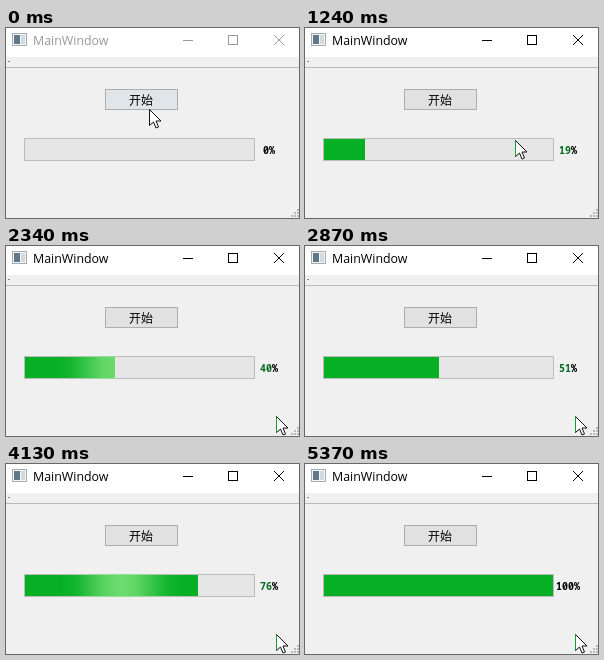
Write an HTML page with a canvas that moves like this. It is 293 px wide and 190 px high and loops after 5.45 s.

```html
<!DOCTYPE html>
<html lang="zh">
<head>
<meta charset="utf-8">
<title>MainWindow</title>
<style>
html, body { margin: 0; width: 100%; height: 100%; overflow: hidden; background: #f0f0f0; }
canvas { display: block; width: 293px; height: 190px; }
</style>
</head>
<body>
<canvas id="stage" width="293" height="190"></canvas>
<script>
const ctx = document.getElementById('stage').getContext('2d');
const LOOP = 5450;
const FIRST_TICK = 69;
const TICK = 77.8;
const PRESS = FIRST_TICK + TICK;
const RELEASE = PRESS + TICK;
const PROGRESS_START = 247;
const MS_PER_PERCENT = 50.85;
const BAR = { x: 18, y: 110, w: 231, h: 23 };
const GLOW = { width: 120, period: 1770, lead: 55, msPerPixel: 4 };

const POINTER_PATH = [
  { t: 300, x: 143, y: 81 },
  { t: 1236, x: 210, y: 112 },
  { t: 2014, x: 269, y: 162 },
  { t: 2090, x: 270, y: 170 }
];

const clamp = (v, low, high) => Math.max(low, Math.min(high, v));
const lerp = (a, b, k) => a + (b - a) * k;

// The screen refreshes at a fixed rate after a short first pause.
function lastTick(t) {
  return t < FIRST_TICK ? 0 : FIRST_TICK + Math.floor((t - FIRST_TICK) / TICK) * TICK;
}

function percentAt(t) {
  return clamp(Math.floor((t - PROGRESS_START) / MS_PER_PERCENT), 0, 100);
}

function pointerAt(t) {
  const i = POINTER_PATH.findIndex(point => point.t > t);
  if (i === 0) return POINTER_PATH[0];
  if (i < 0) return POINTER_PATH[POINTER_PATH.length - 1];
  const a = POINTER_PATH[i - 1], b = POINTER_PATH[i];
  const k = (t - a.t) / (b.t - a.t);
  return { x: Math.round(lerp(a.x, b.x, k)), y: Math.round(lerp(a.y, b.y, k)) };
}

function rect(color, x, y, w, h) {
  ctx.fillStyle = color;
  ctx.fillRect(x, y, w, h);
}

function panel(fill, border, x, y, w, h) {
  rect(border, x, y, w, h);
  rect(fill, x + 1, y + 1, w - 2, h - 2);
}

function text(value, font, color, x, y, align = 'left') {
  ctx.font = font;
  ctx.fillStyle = color;
  ctx.textAlign = align;
  ctx.fillText(value, x, y);
}

function clipped(x, y, w, h, paint) {
  ctx.save();
  ctx.beginPath();
  ctx.rect(x, y, w, h);
  ctx.clip();
  paint();
  ctx.restore();
}

function drawWindow() {
  rect('#f0f0f0', 0, 0, 293, 190);
  rect('#b9b9b9', 0, 39, 293, 1);
  rect('#8a8a8a', 2, 33, 2, 1);
  for (let row = 0; row < 3; row++) {
    for (let col = 2 - row; col < 3; col++) {
      rect('#b8b8b8', 285 + col * 3, 181 + row * 3, 2, 2);
    }
  }
}

function drawTitleBar(active) {
  const ink = active ? '#000' : '#999';
  rect('#fff', 0, 0, 293, 29);

  panel('#f4f5f6', '#a5adb3', 6, 5, 15, 13);
  rect('#60788a', 8, 7, 6, 9);
  rect('#d3dade', 15, 7, 4, 9);

  text('MainWindow', '500 12.4px "Open Sans", "Noto Sans", sans-serif', ink, 27, 17);

  rect(ink, 177, 12, 10, 1);
  ctx.strokeStyle = ink;
  ctx.lineWidth = 1;
  ctx.strokeRect(222.5, 7.5, 9, 9);
  ctx.beginPath();
  ctx.moveTo(268, 7);
  ctx.lineTo(278, 17);
  ctx.moveTo(278, 7);
  ctx.lineTo(268, 17);
  ctx.stroke();
}

function drawButton(t) {
  const pressed = t >= PRESS && t < RELEASE;
  panel('#e1e1e1', pressed ? '#005499' : '#adadad', 99, 61, 73, 21);
  ctx.globalAlpha = clamp(1 - (t - 380) / 300, 0, 1);
  rect(pressed ? '#cce4f7' : '#dfe5e9', 100, 62, 71, 19);
  ctx.globalAlpha = 1;
  text('开始', '500 12px "Noto Sans CJK SC", "Noto Sans CJK", sans-serif', '#000', 135, 77, 'center');
}

function drawGlow(t) {
  const offset = (t + GLOW.lead) % GLOW.period / GLOW.msPerPixel;
  const left = BAR.x - GLOW.width + offset;
  const shade = ctx.createLinearGradient(left, 0, left + GLOW.width, 0);
  for (let k = 0; k <= 1; k += 0.125) {
    const alpha = 0.78 * Math.sin(Math.PI * k) ** 2;
    shade.addColorStop(k, `rgba(140,232,134,${alpha.toFixed(3)})`);
  }
  rect(shade, left, BAR.y, GLOW.width, BAR.h);
}

function drawProgress(t) {
  const percent = percentAt(t);
  const right = Math.min(248, Math.floor(17 + BAR.w * percent / 100));
  const length = Math.max(0, right - BAR.x);
  const running = percent > 0 && percent < 100;

  panel('#e6e6e6', '#bcbcbc', BAR.x, BAR.y, BAR.w, BAR.h);
  rect('#06b025', BAR.x + 1, BAR.y + 1, Math.max(0, length - 1), BAR.h - 2);
  if (running) clipped(BAR.x, BAR.y, length, BAR.h, () => drawGlow(t));

  const font = '600 10px "Noto Sans Mono", monospace';
  const digits = String(percent);
  const x = 263 - (digits.length + 1) * 3;
  text(digits, font, running ? '#066a20' : '#000', x, 126);
  text('%', font, '#000', x + ctx.measureText(digits).width, 126);
}

function drawPointer(t) {
  const { x, y } = pointerAt(t);
  ctx.save();
  ctx.translate(x + 0.5, y + 0.5);
  ctx.fillStyle = '#fff';
  ctx.strokeStyle = '#111';
  ctx.lineWidth = 1;
  const arrow = new Path2D('M0 0V16L4 12.5L6.5 18.5L9 17.5L6.5 11.5H11.5Z');
  ctx.fill(arrow);
  ctx.stroke(arrow);
  if (t > RELEASE) rect('#10a030', -0.5, 0.5, 1, 15);
  ctx.restore();
}

function draw(now) {
  const t = lastTick(now % LOOP);
  drawWindow();
  drawTitleBar(t >= FIRST_TICK);
  drawButton(t);
  drawProgress(t);
  drawPointer(t);
}

const origin = performance.now();
function loop() {
  draw(performance.now() - origin);
  requestAnimationFrame(loop);
}
loop();
</script>
</body>
</html>
```
